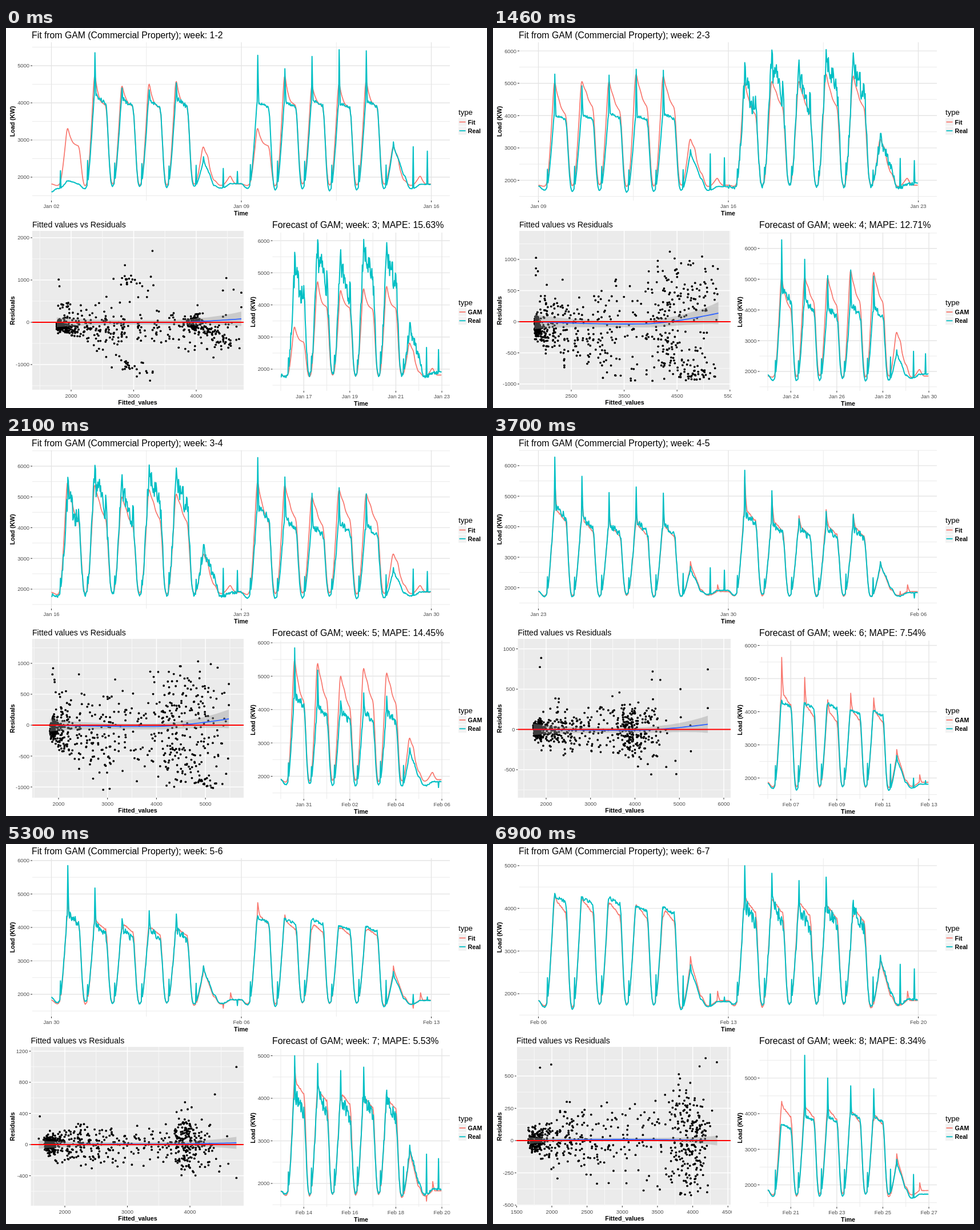
An HTML page with a canvas that plays this animation: 842 px wide and 665 px high, repeating every 8 s.

```html
<!DOCTYPE html>
<html lang="en">
<head>
<meta charset="utf-8">
<title>Load forecast</title>
<style>
  html, body { margin: 0; width: 100%; height: 100%; overflow: hidden; background: #fff; }
  canvas { display: block; }
</style>
</head>
<body>
<canvas id="stage" width="842" height="665"></canvas>
<script>
const ctx = document.getElementById('stage').getContext('2d');
const RED = '#F8766D', TEAL = '#00BFC4';
const PER_DAY = 48, SAT = 5, SUN = 6;

function seeded(seed) {
  return () => {
    seed = (seed + 0x6D2B79F5) | 0;
    let t = Math.imul(seed ^ (seed >>> 15), 1 | seed);
    t = (t + Math.imul(t ^ (t >>> 7), 61 | t)) ^ t;
    return ((t ^ (t >>> 14)) >>> 0) / 4294967296;
  };
}

// Daily key loads (kW) follow from the day's peak and the week's usual working level.
function planWeek({ peaks, level, keep }, index) {
  const rand = seeded(index + 21), about = (v, d) => v + (rand() * 2 - 1) * d;
  return peaks.map((peak, d) => {
    const night = about(1680 + keep * 400, 60);
    if (d === SUN) {
      const flat = night * 1.07;
      return { night, morning: peak, peak: flat, shoulder: flat, evening: flat, late: rand() > 0.4 ? peak * 0.96 : flat };
    }
    const extra = keep * Math.max(0, peak - 4000) ** 2 / 1000;
    const shoulder = d === SAT ? peak * 0.93 : Math.min(peak, about(level, 60) + extra);
    const evening = shoulder * (d === SAT ? 0.75 : 0.97 - keep * 0.3);
    const morning = about(peak < 2000 ? 2200 : 2380, 80);
    return { night, morning, peak, shoulder, evening, late: 0 };
  });
}

// The model's week is the average of two measured weeks, with lower peaks.
function fitWeek(a, b, smooth) {
  return a.map((day, d) => {
    const mean = key => (day[key] + b[d][key]) / 2;
    return {
      night: mean('night') + (smooth ? 80 : 0),
      morning: smooth ? 0 : mean('morning') * (d === SUN ? 0.85 : 0.95),
      peak: mean('peak') * (d === SUN ? 1.12 : d === SAT ? 1.03 : 0.93),
      shoulder: mean('shoulder'), evening: mean('evening'), late: 0
    };
  });
}

function dayKnots({ night, morning, peak, shoulder, evening, late }, before, decay) {
  const top = decay > 0.1 ? peak : Math.min(peak, shoulder);
  const up = f => night + (top - night) * f;
  const down = f => night + (before - night) * f;
  const mid = (shoulder + evening) / 2;
  const knots = [
    [0, before], [0.04, down(0.9)], [0.09, down(0.58)], [0.14, down(0.25)], [0.19, down(0.06)],
    [0.24, night], [0.312, up(0.03)], [16 / 48, morning || up(0.06)], [17 / 48, up(0.1)],
    [0.41, up(0.27)], [0.5, up(0.64)], [0.56, up(0.93)], [28 / 48, up(1)], [29 / 48, peak],
    [29 / 48 + decay * 0.4, peak * 0.45 + shoulder * 0.55], [29 / 48 + decay, shoulder], [40 / 48, mid]
  ];
  if (late) knots.push([41 / 48, late], [42 / 48, mid]);
  return [...knots, [0.97, evening], [1, evening]];
}

function sample(knots, t) {
  const i = knots.findIndex(k => k[0] > t);
  const [t0, v0] = knots[i - 1], [t1, v1] = knots[i];
  return v0 + (v1 - v0) * (t - t0) / (t1 - t0);
}

function weekCurve(days, before, decay, noise, seed) {
  const rand = seeded(seed), out = [];
  for (const day of days) {
    const knots = dayKnots(day, before, decay);
    for (let i = 0; i < PER_DAY; i++) {
      const v = sample(knots, i / PER_DAY);
      const busy = Math.min(1, Math.max(0.12, (v - 1700) / 2500));
      out.push(v + (i === 29 ? 0 : (rand() - 0.5) * noise * busy));
    }
    before = day.evening;
  }
  return out;
}

const smoothed = values => values.map((v, i) =>
  ((values[i - 1] ?? v) + 2 * v + (values[i + 1] ?? v)) / 4);

const plans = [
  { peaks: [1900, 5350, 4400, 4350, 4540, 2550, 2240], level: 4100, keep: 0.05 },
  { peaks: [5280, 4920, 5250, 5430, 5400, 2950, 2800], level: 4030, keep: 0 },
  { peaks: [5640, 6030, 5720, 6040, 5940, 3450, 2770], level: 4000, keep: 0.35 },
  { peaks: [6280, 5650, 5120, 5300, 5100, 2700, 2700], level: 3900, keep: 0.13 },
  { peaks: [5850, 5180, 4260, 4500, 4400, 2850, 1720], level: 3920, keep: 0.13 },
  { peaks: [4350, 4230, 4230, 4050, 4000, 2680, 2000], level: 4250, keep: 0 },
  { peaks: [5000, 4820, 4650, 4730, 4190, 2900, 2700], level: 3900, keep: 0.2 },
  { peaks: [3700, 5640, 5000, 4780, 4700, 2720, 2300], level: 3950, keep: 0 }
];
const weeks = plans.map(planWeek);
const measured = weeks.map((days, i) =>
  weekCurve(days, i ? weeks[i - 1][SUN].evening : 1600, 0.04, 90 + 1800 * plans[i].keep ** 1.5 * 2, i + 5));

// Axes are [reference value, its pixel, pixels per 1000, label step]; rise is in pixels.
const frames = [
  { mape: 15.63, top: [261, 65], ahead: [597, 56.2], left: 46,
    sx: [2000, 114, 109.5, 1000], sy: [0, 515, 74, 1000], spread: 120, rise: 6 },
  { mape: 12.71, top: [266.5, 56.6], ahead: [601, 53.8], left: 46,
    sx: [2500, 137, 92.6, 1000], sy: [0, 514, 109, 500], spread: 210, rise: 15 },
  { mape: 14.45, top: [268, 53.8], ahead: [595.5, 58.4], left: 46,
    sx: [2000, 92, 85.7, 1000], sy: [0, 506, 108.2, 500], spread: 200, rise: 11 },
  { mape: 7.54, top: [265.5, 53.4], ahead: [598.5, 58], left: 43.5,
    sx: [2000, 93, 77.75, 1000], sy: [0, 513.5, 141, 500], spread: 125, rise: 9 },
  { mape: 5.53, top: [263, 58.5], ahead: [594, 74.5], left: 43.5,
    sx: [2000, 103, 109.5, 1000], sy: [0, 526, 136.25, 400], spread: 105, rise: 3 },
  { mape: 8.34, top: [262, 74.7], ahead: [596.5, 62.3], left: 41,
    sx: [2000, 103, 123.3, 500], sy: [0, 519, 226, 250], spread: 95, rise: 0 }
];

frames.forEach((f, n) => {
  const smooth = n < 3;
  const days = fitWeek(weeks[n], weeks[n + 1], smooth);
  f.fit = weekCurve(days, days[SUN].evening, smooth ? 0.17 : 0.08, smooth ? 0 : 40, n + 50);
  if (smooth) f.fit = smoothed(smoothed(f.fit));
  f.real = measured[n].concat(measured[n + 1]);
  f.next = measured[n + 2];
  f.range = [Math.min(...f.fit), Math.max(...f.fit)];
  f.dots = scatterDots(f, n + 90);
});

function scatterDots({ fit, real, range: [min, max], sy, spread }, seed) {
  const rand = seeded(seed), [, zero, scale] = sy;
  const low = (zero - 620) / scale * 1000, high = (zero - 367) / scale * 1000;
  return real.map((v, i) => {
    const f = fit[i % fit.length];
    const x = Math.max(min, Math.min(max, f + (rand() - 0.5) * 50));
    const sd = spread * Math.min(1, 0.3 + Math.max(0, x - min - 60) / 600);
    let r = v - f + (rand() + rand() + rand() - 1.5) * 2 * sd;
    while (r < low || r > high) r *= 0.8;
    return [x, r];
  });
}

const toX = ([ref, px, k]) => v => px + (v - ref) * k / 1000;
const toY = ([ref, px, k]) => v => px - (v - ref) * k / 1000;

function text(str, x, y, size, { align = 'left', color = '#000', bold = false } = {}) {
  ctx.font = `${bold ? 'bold ' : ''}${size}px "Liberation Sans", Arial, sans-serif`;
  ctx.textAlign = align;
  ctx.fillStyle = color;
  ctx.fillText(str, x, y);
}
const tickText = (str, x, y, align) => text(str, x, y, 9.4, { align, color: '#4d4d4d' });
const axisTitle = (str, x, y) => text(str, x, y, 10.7, { align: 'center', bold: true });

function sideTitle(str, x, y) {
  ctx.save();
  ctx.translate(x, y);
  ctx.rotate(-Math.PI / 2);
  axisTitle(str, 0, 0);
  ctx.restore();
}

function line(points, color, width) {
  ctx.beginPath();
  points.forEach(([x, y]) => ctx.lineTo(x, y));
  ctx.strokeStyle = color;
  ctx.lineWidth = width;
  ctx.lineJoin = 'round';
  ctx.stroke();
}

function gridX(box, x, label, labelY, [major, minor]) {
  if (x < box.x0 || x > box.x1) return;
  line([[x, box.y0], [x, box.y1]], label ? major : minor, label ? 1.4 : 1);
  if (!label) return;
  line([[x, box.y1], [x, box.y1 + 3]], '#333', 1);
  tickText(label, x, labelY, 'center');
}

function gridY(box, axis, [major, minor]) {
  const [ref, , , step] = axis, y = toY(axis);
  for (let n = -12; n <= 12; n++) {
    const v = ref + n * step / 2, py = y(v), labelled = n % 2 === 0;
    if (py < box.y0 || py > box.y1) continue;
    line([[box.x0, py], [box.x1, py]], labelled ? major : minor, labelled ? 1.4 : 1);
    if (!labelled) continue;
    line([[box.x0 - 3, py], [box.x0, py]], '#333', 1);
    tickText(v, box.x0 - 5, py + 3.4, 'right');
  }
}

const PALE = ['#e5e5e5', '#ebebeb'], WHITE = ['#fff', '#f8f8f8'];

function dateLabel(day) {
  const d = new Date(Date.UTC(2012, 0, 2 + day));
  return ['Jan', 'Feb'][d.getUTCMonth()] + ' ' + String(d.getUTCDate()).padStart(2, '0');
}

// Labels sit on every second grid line, starting with the one numbered `first`.
function timePanel(box, [px, scale], { x0, x1, days, gap, first, start }, fit, real) {
  const axis = [2000, px, scale, 1000], y = toY(axis), x = d => x0 + (x1 - x0) * d / days;
  gridY(box, axis, PALE);
  for (let i = 0; i * gap <= days; i++) {
    const label = i % 2 === first && dateLabel(start + i * gap);
    gridX(box, x(i * gap), label, box.y1 + 12.5, PALE);
  }
  const trace = values => values.map((v, i) => [x(i / PER_DAY), y(v)]);
  line(trace(fit), RED, 1.7);
  line(trace(real), TEAL, 2);
}

function legend(y, first) {
  text('type', 792, y, 13.2);
  [[first, RED], ['Real', TEAL]].forEach(([name, color], i) => {
    const cy = y + 12.5 + i * 15.3;
    ctx.fillStyle = '#f2f2f2';
    ctx.fillRect(792, cy - 7, 14, 14);
    line([[793.5, cy], [804.5, cy]], color, 1.8);
    text(name, 808.5, cy + 4, 10.7, { bold: true });
  });
}

function trendLine({ range: [min, max], rise }, x, y) {
  const steps = Array.from({ length: 61 }, (_, i) => i / 60);
  const curve = side => steps.map(u => {
    const lift = (2 - rise * 0.4) * Math.sin(Math.PI * u) + rise * Math.max(0, (u - 0.6) / 0.4) ** 1.5;
    const half = (8 + rise * 0.7) * (0.3 + 0.4 * (1 - u) ** 6 + 0.75 * u ** 6);
    return [x(min + (max - min) * u), y(0) - lift + side * half];
  });
  ctx.beginPath();
  [...curve(1), ...curve(-1).reverse()].forEach(p => ctx.lineTo(...p));
  ctx.fillStyle = 'rgba(153,153,153,.4)';
  ctx.fill();
  line(curve(0), '#3366ff', 1.8);
}

function scatterPanel(f) {
  const box = { x0: f.left, y0: 355, x1: 416, y1: 633 };
  const x = toX(f.sx), y = toY(f.sy), [ref, , , step] = f.sx;
  text('Fitted values vs Residuals', f.left, 349, 14.1);
  ctx.fillStyle = '#ebebeb';
  ctx.fillRect(box.x0, box.y0, box.x1 - box.x0, box.y1 - box.y0);
  gridY(box, f.sy, WHITE);
  ctx.save();
  ctx.beginPath();
  ctx.rect(0, 350, 418, 315);
  ctx.clip();
  for (let n = -4; n <= 12; n++) {
    const v = ref + n * step / 2;
    gridX(box, x(v), n % 2 === 0 && v, 646.5, WHITE);
  }
  ctx.restore();

  ctx.fillStyle = '#000';
  for (const [v, r] of f.dots) {
    ctx.beginPath();
    ctx.arc(x(v), y(r), 1.9, 0, 7);
    ctx.fill();
  }
  trendLine(f, x, y);
  line([[box.x0, y(0)], [box.x1, y(0)]], '#f00', 1.8);
  axisTitle('Fitted_values', 230.5, 658.5);
  sideTitle('Residuals', 14.5, 494.5);
}

function draw(n) {
  const f = frames[n];
  ctx.fillStyle = '#fff';
  ctx.fillRect(0, 0, 842, 665);

  text(`Fit from GAM (Commercial Property); week: ${n + 1}-${n + 2}`, 45, 18, 15.8);
  timePanel({ x0: 46, y0: 25, x1: 777, y1: 302 }, f.top,
    { x0: 79.5, x1: 744.5, days: 14, gap: 3.5, first: 0, start: n * 7 }, f.fit.concat(f.fit), f.real);
  axisTitle('Time', 411.5, 328);
  sideTitle('Load (KW)', 14.5, 163.5);
  legend(152, 'Fit');

  scatterPanel(f);

  text(`Forecast of GAM; week: ${n + 3}; MAPE: ${f.mape}%`, 466, 350, 15.9);
  timePanel({ x0: 466.5, y0: 358, x1: 777, y1: 635 }, f.ahead,
    { x0: 481, x1: 763, days: 7, gap: 1, first: 1, start: n * 7 + 14 }, f.fit, f.next);
  axisTitle('Time', 621.5, 660.5);
  sideTitle('Load (KW)', 435.5, 497);
  legend(484.5, 'GAM');
}

// Each view lasts 1600 ms; the 8000 ms loop opens 1100 ms into the first.
const LOOP = 8000, HOLD = 1600, OFFSET = 1100;
const start = performance.now();
let shown = -1;
function tick() {
  const t = (performance.now() - start) % LOOP;
  const n = Math.floor((t + OFFSET) / HOLD);
  if (n !== shown) draw(shown = n);
  requestAnimationFrame(tick);
}
tick();
</script>
</body>
</html>
```
